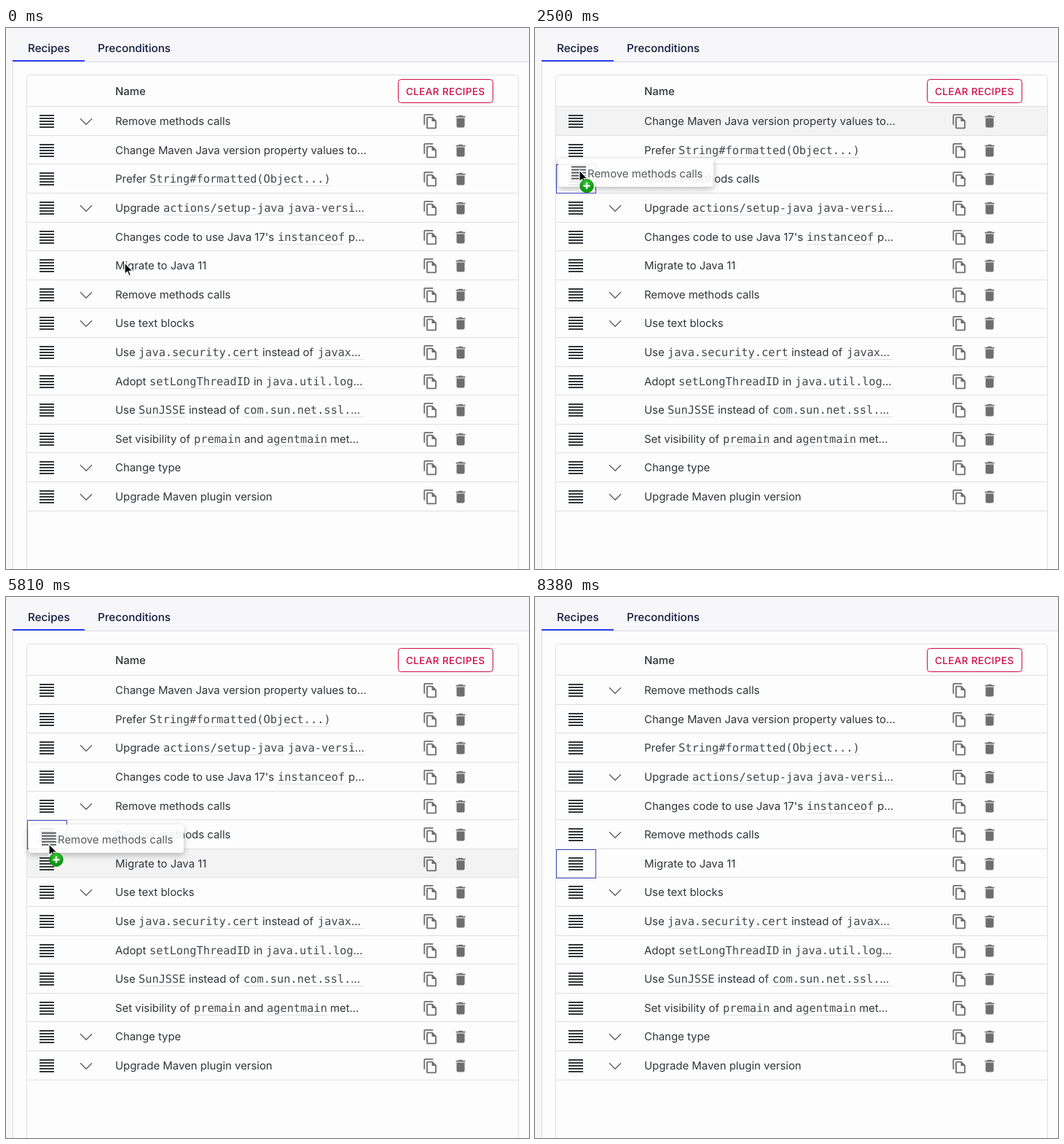
Write an HTML page that moves like this. It is 718 px wide and 742 px high and loops after 8.81 s.

```html
<!DOCTYPE html>
<html lang="en">
<head>
<meta charset="utf-8">
<title>Recipes</title>
<style>
  html, body { margin: 0; width: 100%; height: 100%; overflow: hidden; background: #f7f7fa; }
  svg { display: block; width: 718px; height: 742px; }
  text { font: 14.92px Inter, sans-serif; fill: #303438; text-rendering: geometricPrecision; }
  .code { font: 15.3px "DejaVu Sans Mono", monospace; fill: #43474b; }
  .tab { font-size: 15.2px; font-weight: 500; fill: #101a3c; }
  .head { font-weight: 500; }
  .clear { font-size: 13.5px; font-weight: 500; letter-spacing: .02857em; fill: #cf0a45; }
  .line { stroke: #dfdfe1; fill: none; }
  .dots { stroke: #c4c4c6; stroke-dasharray: 1 1; }
  .icon { fill: #6e6e6e; }
  .chevron { fill: none; stroke: #5a5d61; stroke-width: 1.3; }
  .handle { stroke: #34383d; stroke-width: 2; }
</style>
</head>
<body>
<svg viewBox="0 0 718 742">
  <defs>
    <path id="handle" class="handle" d="M46-8h20M46-4h20M46 0h20M46 4h20M46 8h20"/>
    <path id="chevron" class="chevron" d="M102-3.7l8 8l8-8"/>
    <g id="actions" class="icon">
      <path transform="translate(571.6 -11) scale(.925)" d="M16 1H4c-1.1 0-2 .9-2 2v14h2V3h12V1zm-1 4H8c-1.1 0-1.99.9-1.99 2L6 21c0 1.1.89 2 1.99 2H19c1.1 0 2-.9 2-2V11l-6-6zM8 21V7h6v5h5v9H8z"/>
      <path transform="translate(613 -11) scale(.925)" d="M6 19c0 1.1.9 2 2 2h8c1.1 0 2-.9 2-2V7H6v12zM19 4h-3.5l-1-1h-5l-1 1H5v2h14V4z"/>
    </g>
    <radialGradient id="green" cy=".3">
      <stop offset="0" stop-color="#3ccb3c"/><stop offset="1" stop-color="#0d9a12"/>
    </radialGradient>
    <filter id="shadow" x="-15%" y="-60%" width="130%" height="230%">
      <feDropShadow dx="0" dy="3" stdDeviation="4.5" flood-opacity=".3"/>
    </filter>
  </defs>
  <rect x="9.5" y="46.5" width="720" height="710" fill="#fdfdfd" stroke="#dcdce0"/>
  <path d="M9 45h99" stroke="#2f40f5" stroke-width="2"/>
  <text class="tab" x="30" y="33">Recipes</text>
  <text class="tab" x="126" y="33">Preconditions</text>
  <rect class="line" x="28.5" y="64.5" width="675" height="700" rx="4"/>
  <text class="head" x="150" y="92">Name</text>
  <rect x="538.5" y="70.5" width="130" height="32" rx="4" fill="#fff" stroke="#cf0a45"/>
  <text class="clear" x="549" y="92">CLEAR RECIPES</text>
  <rect id="hover" x="29" width="674" height="39" fill="#f3f3f3"/>
  <g id="lines"></g>
  <g id="rows"></g>
  <rect id="focus" x="29.5" width="54" height="39" fill="none" stroke="#3f4bbd"/>
  <g id="preview">
    <g filter="url(#shadow)" opacity=".9"><rect width="213" height="38.5" rx="4" fill="#fff"/></g>
    <g opacity=".82">
      <use href="#handle" x="-28" y="19.5"/>
      <text x="40" y="25.5">Remove methods calls</text>
    </g>
  </g>
  <g id="cursor">
    <path d="M0 0V15.6L3.6 12.3L6 17.9L8.4 16.9L6.1 11.4H11Z" stroke="#fff" stroke-width="1.2"/>
    <g id="badge" transform="translate(10 21.5)">
      <circle r="9.3" fill="url(#green)" stroke="#0b8510" stroke-width=".7"/>
      <path d="M-4.5 0h9M0-4.5v9" stroke="#fff" stroke-width="2.2"/>
    </g>
  </g>
</svg>
<script>
const LOOP = 8810, TOP = 107.08, PITCH = 39.61;
const $ = id => document.getElementById(id);
const rowY = i => Math.round(TOP + PITCH * i);

// Each recipe: expandable?, text, then x / text pairs; a leading backtick marks code.
const recipes = [
  [1, 'Remove methods calls'],
  [0, 'Change Maven Java version property values to…'],
  [0, 'Prefer', 197, '`String#formatted(Object...)'],
  [1, 'Upgrade', 216, '`actions/setup-java', 387, '`java-versi…'],
  [0, "Changes code to use Java 17's", 373, '`instanceof', 470, 'p…'],
  [0, 'Migrate to Java 11'],
  [1, 'Remove methods calls'],
  [1, 'Use text blocks'],
  [0, 'Use', 182, '`java.security.cert', 352, 'instead of', 428, '`javax…'],
  [0, 'Adopt', 197, '`setLongThreadID', 340, 'in', 357, '`java.util.log…'],
  [0, 'Use', 182, '`SunJSSE', 251, 'instead of', 326, '`com.sun.net.ssl.…'],
  [0, 'Set visibility of', 258, '`premain', 327, 'and', 358, '`agentmain', 445, 'met…'],
  [1, 'Change type'],
  [1, 'Upgrade Maven plugin version']
];

function run(x, str) {
  if (str[0] !== '`') return `<text x="${x}" y="5">${str}</text>`;
  const cut = str.endsWith('…'), code = str.slice(1).replace('…', '');
  const end = cut ? 492 : x + code.length * 9.21;
  return `<text x="${x}" y="5"><tspan class="code">${code}</tspan>${cut ? '…' : ''}</text>` +
    `<path class="dots" d="M${x} 9.5H${end}"/>`;
}

function rowMarkup([expandable, text, ...rest]) {
  let out = '<use href="#handle"/><use href="#actions"/>' + run(150, text);
  if (expandable) out += '<use href="#chevron"/>';
  for (let i = 0; i < rest.length; i += 2) out += run(rest[i], rest[i + 1]);
  return `<g>${out}</g>`;
}

$('rows').innerHTML = recipes.map(rowMarkup).join('');
$('lines').innerHTML = Array.from({ length: 15 }, (_, i) =>
  `<path class="line" d="M29 ${rowY(i) + .5}H703"/>`).join('');
const rows = [...$('rows').children];

// Pointer path: time, x, y
const path = [
  [0, 163, 322], [60, 163, 322], [500, 122, 262], [940, 76, 178], [1400, 58, 130],
  [1700, 57, 124], [1880, 57, 125], [1940, 57, 134], [2500, 61, 195], [2880, 62, 234],
  [3300, 61, 297], [3560, 60, 283], [4380, 60, 283], [4940, 57, 371], [5310, 57, 371],
  [5810, 59, 339], [6160, 60, 262], [6600, 61, 160], [6880, 62, 133], [7630, 62, 133],
  [7850, 50, 270], [8100, 44, 500], [8380, 50, 760], [LOOP, 50, 760]
];
// dx, dy: grab point inside the preview
const drags = [
  { press: 1880, start: 1940, drop: 3750, moved: 4130, from: 0, to: 4, dx: 29, dy: 16 },
  { press: 5250, start: 5370, drop: 7130, moved: 7630, from: 6, to: 0, dx: 28, dy: 26.5 }
];

function pointer(t) {
  const i = path.findIndex(k => k[0] > t), [t0, x0, y0] = path[i - 1], [t1, x1, y1] = path[i];
  const p = (t - t0) / (t1 - t0);
  return [x0 + (x1 - x0) * p, y0 + (y1 - y0) * p];
}

const show = (el, on) => el.setAttribute('visibility', on ? 'visible' : 'hidden');
const move = (el, x, y) => el.setAttribute('transform', `translate(${x} ${y})`);

function mark(el, i, dy) {
  const on = i >= 0 && i < recipes.length;
  show(el, on);
  if (on) el.setAttribute('y', rowY(i) + dy);
}

function draw(t) {
  const [x, y] = pointer(t);
  const under = Math.floor((y - TOP) / PITCH);
  const order = recipes.map((_, i) => i);
  let hover = t < 60 ? -1 : under, focus = -1, active = null;

  for (const d of drags) {
    if (t < d.press) break;
    focus = d.from;
    if (t < d.start) break;
    const dragging = t < d.drop;
    const to = dragging ? under : d.to;
    order.splice(to, 0, order.splice(d.from, 1)[0]);
    if (t < d.moved) hover = d.from;
    if (dragging) { active = d; focus = to; }
  }

  order.forEach((id, i) => move(rows[id], 0, rowY(i) + 21));
  mark($('hover'), hover, 1);
  mark($('focus'), focus, 1.5);
  show($('preview'), active);
  show($('badge'), active);
  if (active) move($('preview'), x - active.dx, y - active.dy);
  move($('cursor'), x, y);
}

function frame() {
  draw(performance.now() % LOOP);
  requestAnimationFrame(frame);
}
frame();
</script>
</body>
</html>
```
